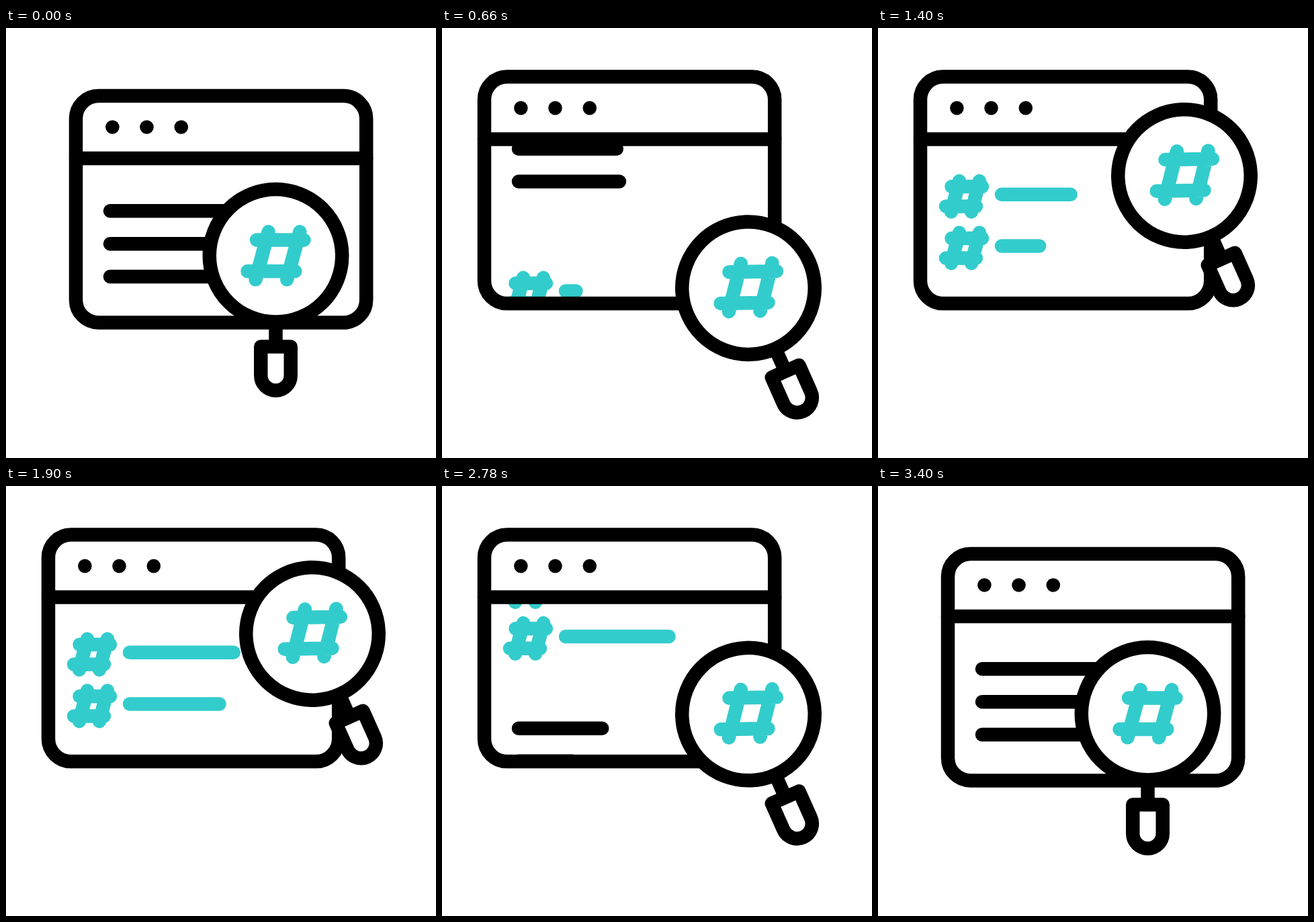
Recreate the animation shown at these times as an HTML page. Size 640 by 640 pixels, loop 3600 ms.

```html
<!DOCTYPE html>
<html lang="en">
<head>
<meta charset="utf-8">
<title>Hashtag search</title>
<style>
  html, body { margin: 0; width: 100%; height: 100%; overflow: hidden; background: #fff; }
  svg { display: block; width: 100vw; height: 100vh; }
  .ink { fill: none; stroke: #000; stroke-width: 20.5; stroke-linecap: round; stroke-linejoin: round; }
  .teal { stroke: #33cccc; }
  .paper { fill: #fff; }
</style>
</head>
<body>
<svg viewBox="0 0 640 640">
  <defs>
    <clipPath id="page"><rect x="104" y="194" width="432" height="234.6"/></clipPath>
    <path id="smallHash" d="M150.5 264.5H196M142 294H187M162 256.3L150 301.8M192 256.3L180 301.8"/>
  </defs>

  <g id="browser" class="ink">
    <g clip-path="url(#page)">
      <g id="text"></g>
      <g id="tags" class="teal">
        <use href="#smallHash"/>
        <use href="#smallHash" y="76.8"/>
      </g>
    </g>
    <rect x="104" y="101" width="432.2" height="337.5" rx="33.8"/>
    <path d="M104 194H536.2"/>
    <g fill="#000" stroke="none">
      <circle cx="158.4" cy="147.5" r="10.3"/>
      <circle cx="209.5" cy="147.5" r="10.3"/>
      <circle cx="260.8" cy="147.5" r="10.3"/>
    </g>
  </g>

  <g id="lens" class="ink">
    <path d="M0 98V135"/>
    <path class="paper" d="M-22.25 135.5H22.25V178.4a22.25 22.25 0 0 1-44.5 0Z"/>
    <circle class="paper" r="98.75"/>
  </g>
  <path id="hash" class="ink teal" d="M-28.5-23.3H42M-42 23.2H28.8M-10.8-35.5L-30 35.5M35.8-35.5L16.6 35.5"/>
</svg>
<script>
const LOOP = 3600, STEP = 20;
const TILT = 24, ARM = 180;            // lens swings about a pivot ARM below its centre
const HOME = [401.5, 338.8], AWAY = [456, 392], RISE = 172;
const SCROLL_IN = 257, SCROLL_OUT = 217.5;

const $ = id => document.getElementById(id);
const mix = (a, b, k) => a + (b - a) * k;
const rad = deg => deg * Math.PI / 180;

// Eased 0..1 between two times.
function ease(t, from, to) {
  const k = Math.min(1, Math.max(0, (t - from) / (to - from)));
  return k * k * (3 - 2 * k);
}
// There between a and b, back between c and d.
const trip = (t, a, b, c, d) => ease(t, a, b) - ease(t, c, d);

function addLine(parent, x, y, length, from, to) {
  const el = document.createElementNS('http://www.w3.org/2000/svg', 'path');
  $(parent).append(el);
  return { el, x, y, length, from, to };
}
function drawLine(line, k) {
  line.el.setAttribute('d', `M${line.x} ${line.y}h${line.length * mix(0.1, 1, k)}`);
}

const textLines = [
  addLine('text', 155, 272.3, 171.2, 2400, 3000),
  addLine('text', 155, 321.2, 145.8, 2400, 3160),
  addLine('text', 155, 370, 150, 2400, 3400)
];
const tagLines = [
  addLine('tags', 225, 276.1, 154.7, 900, 1755),
  addLine('tags', 225, 352.9, 153.6, 950, 2200)
];

function place(id, x, y, turn = 0) {
  $(id).setAttribute('transform', `translate(${x} ${y}) rotate(${turn})`);
}

function draw(t) {
  const shift = trip(t, 200, 600, 3000, 3400);
  const rise = trip(t, 600, 1200, 2400, 3000);
  const scrollIn = ease(t, 200, 1200);
  const scrollOut = ease(t, 2400, 3200);
  const leaving = t >= 2400;

  place('browser', -41 * shift, -28.4 * shift);
  place('text', 0, leaving ? SCROLL_OUT * (1 - scrollOut) : -SCROLL_IN * scrollIn);
  place('tags', 0, leaving ? -SCROLL_OUT * scrollOut : SCROLL_IN * (1 - scrollIn));
  textLines.forEach(l => drawLine(l, leaving ? ease(t, l.from, l.to) : 1));
  tagLines.forEach(l => drawLine(l, ease(t, l.from, l.to)));

  const end = rad(TILT), now = rad(TILT * shift);
  const pivotX = mix(HOME[0], AWAY[0] + ARM * Math.sin(end), shift);
  const pivotY = mix(HOME[1] + ARM, AWAY[1] + ARM * Math.cos(end), shift);
  const x = pivotX - ARM * Math.sin(now);
  const y = pivotY - ARM * Math.cos(now) - RISE * rise;
  place('lens', x, y, -TILT * shift);
  place('hash', x + 0.3 * shift, y - 1.2 * shift, -shift);
}

const start = performance.now();
function tick() {
  const t = (performance.now() - start) % LOOP;
  draw(Math.floor(t / STEP) * STEP);
  requestAnimationFrame(tick);
}
tick();
</script>
</body>
</html>
```
